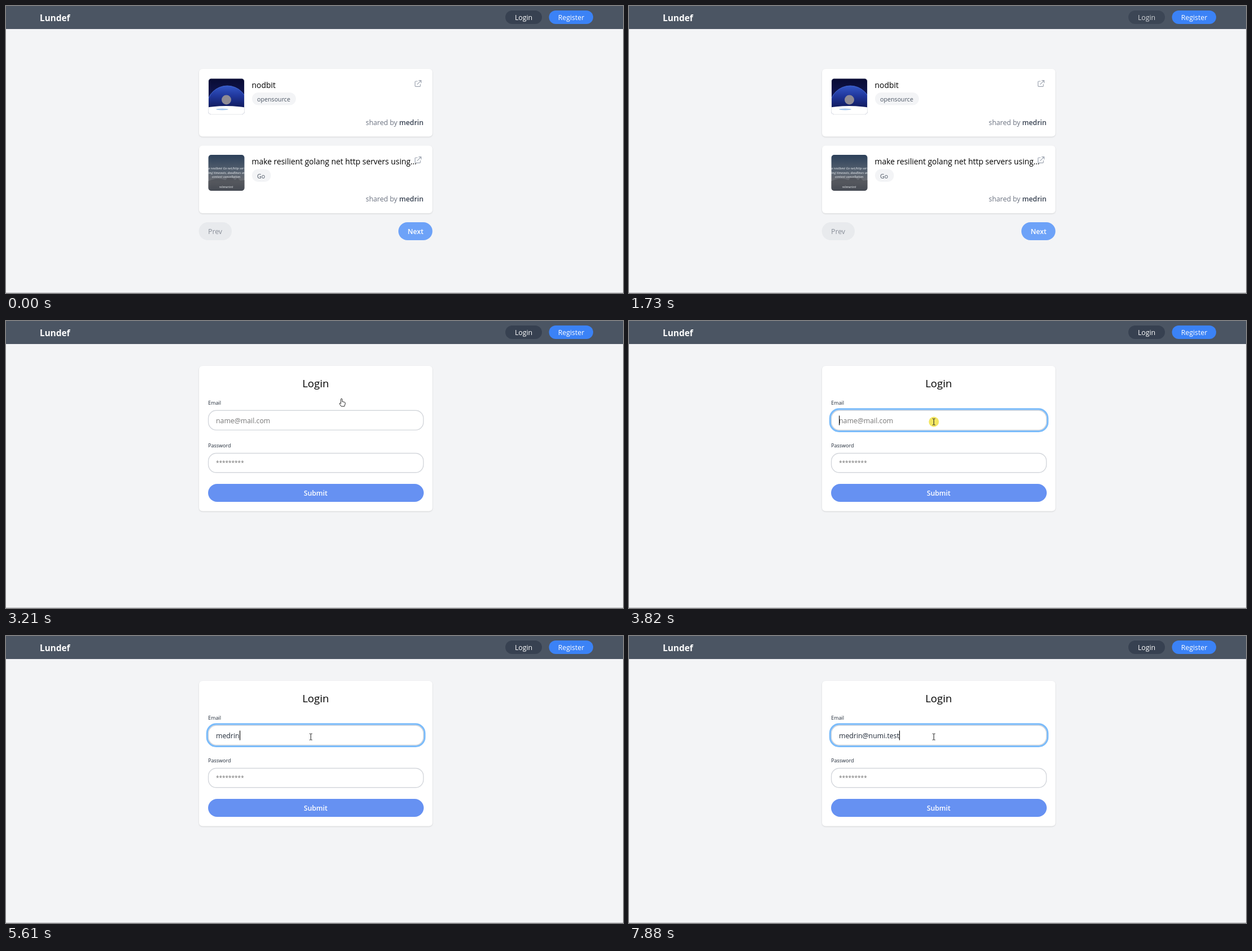
Recreate the animation shown at these times as an HTML page. Size 1096 px wide and 511 px high, loop 8 s.

```html
<!DOCTYPE html>
<html lang="en">
<head>
<meta charset="utf-8">
<title>Link sharing: login</title>
<style>
  html, body { margin: 0; width: 100%; height: 100%; overflow: hidden; background: #f3f4f6; }
  svg { display: block; }
  text { font: 12.3px "Open Sans", "Noto Sans", sans-serif; white-space: pre; }
  .medium { font-weight: 500; }
  .semi { font-weight: 600; }
  .title { font-size: 13.9px; font-weight: 500; }
  .tag { font-size: 10.7px; fill: #4b5563; }
  .label { font-size: 9px; fill: #1f2937; }
  .hint { fill: #757575; }
  .white { fill: #fff; }
  .mid { text-anchor: middle; }
  .end { text-anchor: end; fill: #6b7280; }
  .end tspan { fill: #374151; font-weight: 600; }
  .card { fill: #fff; filter: drop-shadow(0 1px 1px rgba(0, 0, 0, .13)); }
  .field { fill: #fff; stroke: #d4d7dc; stroke-width: 1.4; }
  .icon { fill: none; stroke: #9ca3af; stroke-width: 1.7; stroke-linecap: round; stroke-linejoin: round; }
  .cover text { font: italic 5.4px "Noto Serif", serif; fill: #e8ecf0; }
  .pointer { fill: #fff; stroke: #111; stroke-width: .9; stroke-linejoin: round; }
</style>
</head>
<body>
<svg width="1096" height="511" viewBox="0 0 1096 511">
  <defs>
    <clipPath id="thumb"><rect x="359.5" y="129" width="64" height="64" rx="5"/></clipPath>
    <linearGradient id="sky" x2="0" y2="1">
      <stop stop-color="#080b33"/><stop offset="1" stop-color="#1b2474"/>
    </linearGradient>
    <linearGradient id="planet" x2="0" y2="1">
      <stop stop-color="#3458c8"/><stop offset=".25" stop-color="#20379c"/><stop offset=".6" stop-color="#0d1450"/>
    </linearGradient>
    <linearGradient id="dusk" x2="0" y2="1">
      <stop stop-color="#2c4059"/><stop offset=".45" stop-color="#56616f"/>
      <stop offset=".75" stop-color="#6b6c71"/><stop offset="1" stop-color="#454c58"/>
    </linearGradient>
    <path id="open" class="icon" transform="translate(723.9 129.9) scale(.677)"
      d="M10 6H6a2 2 0 0 0-2 2v10a2 2 0 0 0 2 2h10a2 2 0 0 0 2-2v-4M14 4h6v6M20 4 10 14"/>
  </defs>

  <rect width="1096" height="511" fill="#f3f4f6"/>
  <rect y="510" width="1096" height="1" fill="#bfc1c4"/>
  <rect width="1096" height="41" fill="#4b5563"/>
  <text x="60" y="26.5" class="white" style="font-size:15.4px;font-weight:700">Lundef</text>
  <g id="loginLink">
    <rect x="887" y="8" width="65" height="24" rx="12" fill="#374151"/>
    <text x="919.5" y="25" class="white mid">Login</text>
  </g>
  <rect x="964.5" y="8" width="78.5" height="24" rx="12" fill="#3b82f6"/>
  <text x="1004" y="25" class="white mid">Register</text>

  <g id="listPage">
    <rect class="card" x="343" y="112" width="414.5" height="120.5" rx="6"/>
    <g clip-path="url(#thumb)">
      <rect x="359" y="129" width="65" height="65" fill="url(#sky)"/>
      <circle cx="393" cy="178" r="36" fill="url(#planet)" stroke="#4d74e0" stroke-width=".8"/>
      <ellipse cx="391" cy="193" rx="60" ry="15" fill="#fff"/>
      <ellipse cx="384" cy="184" rx="11" ry="1.5" fill="#a9c8ec"/>
      <circle cx="391.5" cy="167" r="8.5" fill="#8f8b95"/>
    </g>
    <rect x="359.5" y="129" width="64" height="64" rx="5" fill="none" stroke="#e5e7eb"/>
    <text x="436.5" y="145.5" class="title">nodbit</text>
    <rect x="437" y="154" width="78" height="22.5" rx="11.2" fill="#f3f4f6"/>
    <text x="446" y="170" class="tag">opensource</text>
    <text x="741.5" y="211.5" class="end">shared by <tspan>medrin</tspan></text>
    <use href="#open"/>

    <rect class="card" x="343" y="248.5" width="414.5" height="120.5" rx="6"/>
    <g class="cover" transform="translate(0 136)" clip-path="url(#thumb)">
      <rect x="359" y="129" width="65" height="65" fill="url(#dusk)"/>
      <path d="M359 176q16-8 31-2l4-5 8 1 5 4 4-4 5 5 8-1v20h-65z" fill="#474a50" opacity=".6"/>
      <text x="391" y="154.5" class="mid">make resilient Go net/http servers</text>
      <text x="391" y="162.5" class="mid">using timeouts, deadlines and</text>
      <text x="391" y="170" class="mid">context cancellation</text>
      <text x="391" y="188" class="mid" style="font-size:4.4px">velomar.test</text>
    </g>
    <text x="436.5" y="282" class="title">make resilient golang net http servers using…</text>
    <rect x="437" y="290.5" width="33.5" height="22.5" rx="11.2" fill="#f3f4f6"/>
    <text x="446" y="306.5" class="tag">Go</text>
    <text x="741.5" y="347.5" class="end">shared by <tspan>medrin</tspan></text>
    <use href="#open" y="136"/>

    <rect x="342.5" y="385" width="58.5" height="32" rx="16" fill="#e8eaed"/>
    <text x="371.5" y="406" class="medium mid" fill="#888e98">Prev</text>
    <rect x="697" y="385" width="60.5" height="32" rx="16" fill="#6da2f8"/>
    <text x="727.5" y="406" class="white semi mid">Next</text>
  </g>

  <g id="loginPage">
    <rect class="card" x="343" y="80" width="414.5" height="258.5" rx="6"/>
    <text x="550" y="117.5" class="medium mid" style="font-size:18.6px">Login</text>
    <text x="359" y="149" class="label">Email</text>
    <rect id="ring" x="357.3" y="157" width="386.2" height="39.2" rx="16" fill="none" stroke="#7cbcfa" stroke-width="3.4"/>
    <rect class="field" x="359.5" y="159.3" width="382" height="34.8" rx="14"/>
    <text id="email" x="373" y="182"></text>
    <rect id="caret" y="168.5" width="1.1" height="17" fill="#000"/>
    <text x="359" y="225" class="label">Password</text>
    <rect class="field" x="359.5" y="235.5" width="382" height="34.3" rx="14"/>
    <text x="373" y="255.5" class="hint" style="font-size:10px">*********</text>
    <rect x="359" y="290" width="383" height="32" rx="16" fill="#6691f2"/>
    <text x="550" y="311" class="white semi mid">Submit</text>
  </g>

  <g id="cursor">
    <circle id="click" r="9" fill="rgba(235,215,0,.62)"/>
    <path id="arrow" class="pointer" d="M0 0v10l2.3-2 1.5 3.6 1.6-.7-1.5-3.4h3z"/>
    <path id="hand" class="pointer" d="M-1.2 1a1.2 1.2 0 0 1 2.4 0v4l4 .9q1.4.4 1.4 1.8l-.6 3.2-1 2.6h-5.4l-3-4.2q-.7-1.2.4-1.6t1.8 1z"/>
    <path id="beam" d="M-2.5-5.5h1.8L0-5l.7-.5h1.8M0-5V5M-2.5 5.5h1.8L0 5l.7.5h1.8" fill="none" stroke="#222"/>
  </g>
</svg>
<script>
const LOOP = 8000;
const ADDRESS = "medrin@numi.test";
const KEY_TIMES = [4350, 4620, 4820, 4950, 5090, 5610, 6480, 6680, 6880, 7020, 7150, 7280, 7480, 7580, 7680, 7880];
const FOCUS = 3820, BLINK = 535;

// Pointer moves: first step, last step, number of steps, end point
const MOVES = [
  [320, 460, 3, 1004, 230],
  [660, 920, 5, 925, 17],
  [1530, 1730, 4, 1097, 660],
  [2000, 2000, 1, 893, 32],
  [2067, 2200, 3, 820, 54],
  [2800, 3210, 7, 596, 138.5],
  [3278, 3550, 5, 555, 156],
  [3620, 3680, 2, 541.5, 179.5],
];

const $ = id => document.getElementById(id);
const show = (id, on) => $(id).setAttribute("visibility", on ? "visible" : "hidden");
const within = (t, from, to) => t >= from && t < to;

function pointerAt(t) {
  let x = 1020, y = 351;
  for (const [start, end, steps, toX, toY] of MOVES) {
    if (t < start) break;
    const step = 1 + Math.floor((t - start) / (end - start || 1) * (steps - 1) + 1e-6);
    const p = Math.min(step / steps, 1);
    x += (toX - x) * p;
    y += (toY - y) * p;
  }
  return [x, y];
}

function drawEmail(t) {
  const typed = KEY_TIMES.filter(k => t >= k).length;
  const email = $("email");
  email.textContent = typed ? ADDRESS.slice(0, typed) : "name@mail.com";
  email.setAttribute("fill", typed ? "#1f2937" : "#757575");
  const lastKey = typed ? KEY_TIMES[typed - 1] : FOCUS;
  const width = typed ? email.getComputedTextLength() : 0;
  $("caret").setAttribute("x", 373 + Math.round(width));
  show("caret", t >= FOCUS && Math.floor((t - lastKey) / BLINK) % 2 === 0);
}

function draw(t) {
  const onLogin = t >= 2000;
  $("listPage").style.display = onLogin ? "none" : "";
  $("loginPage").style.display = onLogin ? "" : "none";
  $("loginLink").setAttribute("opacity", within(t, 855, 2067) ? .75 : 1);
  show("ring", t >= FOCUS);
  drawEmail(t);

  const beam = t >= 3620;
  const hand = within(t, 1060, 1530) || within(t, 3140, 3620);
  $("cursor").setAttribute("transform", `translate(${pointerAt(t)})`);
  show("click", within(t, 1260, 1530) || within(t, FOCUS, 4090));
  show("beam", beam);
  show("hand", hand);
  show("arrow", t >= 320 && !beam && !hand);
}

function tick() {
  draw(performance.now() % LOOP);
  requestAnimationFrame(tick);
}
tick();
</script>
</body>
</html>
```
